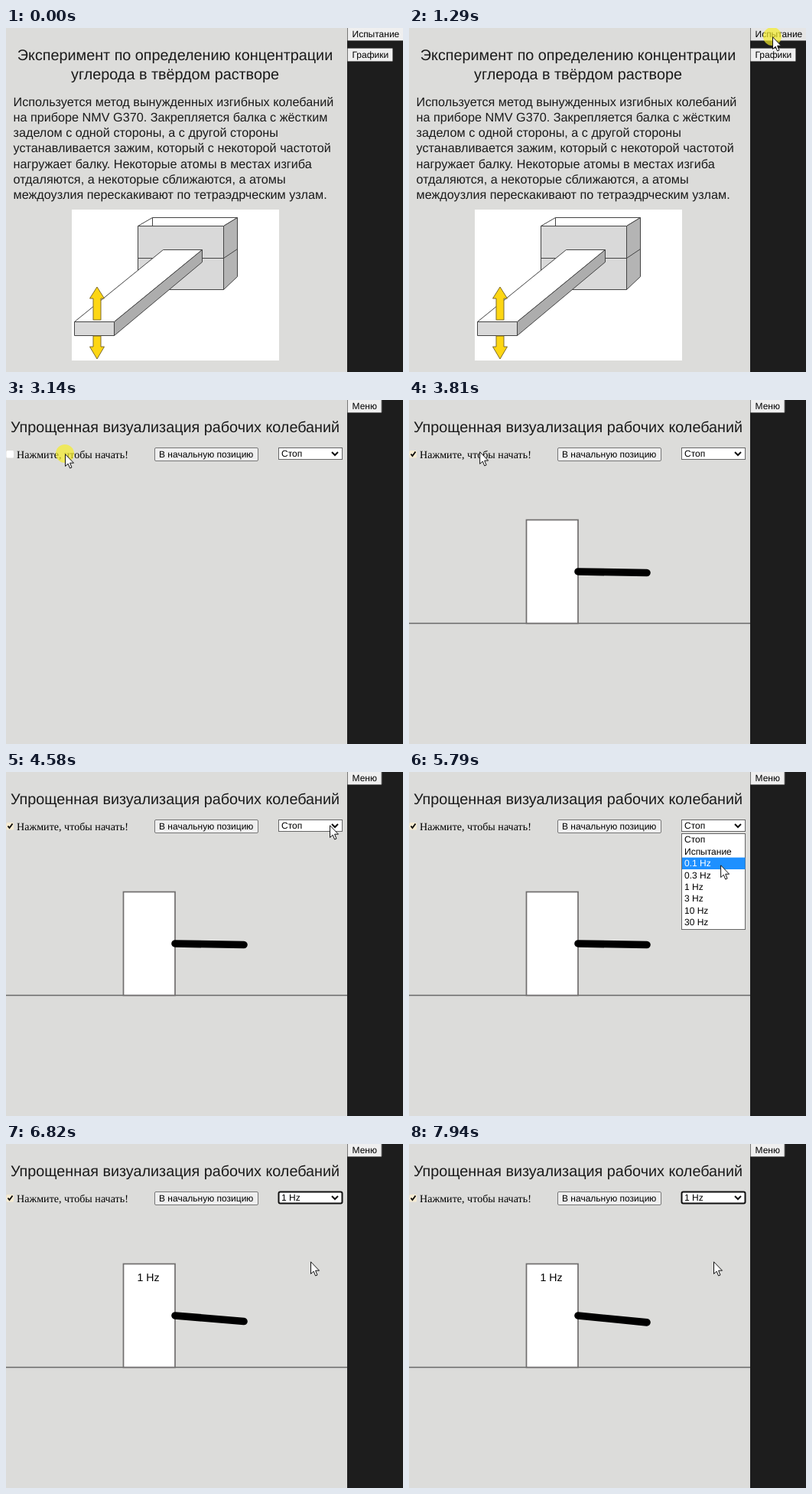
These frames come from a looping animation (519x449 px, 8 s). An HTML page:

```html
<!DOCTYPE html>
<html lang="ru">
<head>
<meta charset="utf-8">
<style>
  html, body { margin: 0; width: 519px; height: 449px; overflow: hidden; background: #dcdcda; }
  svg { display: block; font: 12px "Liberation Sans", Arial, sans-serif; text-rendering: geometricPrecision; }
  .title { font-size: 19.8px; text-anchor: middle; fill: #1a1a1a; }
  .body { font-size: 16.22px; fill: #1a1a1a; }
  .label { font: 14.1px "Liberation Serif", "Times New Roman", serif; }
  .btn { fill: #efefef; stroke: #767676; }
  .hover { fill: #e5e5e5; }
  .edge { stroke: #444; stroke-width: 1; stroke-linejoin: round; }
  .arrow { fill: #fdd613; stroke: #7d6a2c; }
</style>
</head>
<body>
<svg width="519" height="449" viewBox="0 0 519 449">
  <rect width="519" height="449" fill="#dcdcda"/>
  <rect x="446" width="73" height="449" fill="#1d1d1d"/>

  <g id="intro">
    <text class="title" x="221" y="41.5">Эксперимент по определению концентрации</text>
    <text class="title" x="221" y="67">углерода в твёрдом растворе</text>
    <g id="lines" class="body"></g>
    <rect x="86" y="237" width="271" height="197" fill="#fff"/>
    <g class="edge" transform="translate(.5 .5)">
      <path fill="#fff" d="M172 258L191 247H302L284 258Z"/>
      <path fill="none" d="M191 247V258"/>
      <path fill="#b4b4b4" d="M284 258L302 247V324L284 341Z"/>
      <path fill="#d9d9d9" d="M172 258H284V341H172Z"/>
      <path fill="none" d="M172 300H284L302 288"/>
      <path fill="#fff" d="M89 383L205 289H256L141 383Z"/>
      <path fill="#adadad" d="M141 383L256 289V305L141 401Z"/>
      <path fill="#d9d9d9" d="M89 383H141V401H89Z"/>
    </g>
    <path class="arrow" d="M119 338L128.500 353H124V381H114V353H109.500Z"/>
    <path class="arrow" d="M114 402H124V416H128.500L119 432L109.500 416H114Z"/>
    <rect id="testBtn" class="btn" x="446.500" y="-2" width="80" height="18.500" rx="1"/>
    <text x="452.500" y="12">Испытание</text>
    <rect class="btn" x="446.500" y="26.500" width="59" height="17" rx="1"/>
    <text x="452.500" y="39">Графики</text>
  </g>

  <g id="demo">
    <text class="title" x="221" y="41.5">Упрощенная визуализация рабочих колебаний</text>
    <rect id="menuBtn" class="btn" x="446.500" y="-2" width="44.500" height="18.500" rx="1"/>
    <text x="452.500" y="12">Меню</text>
    <rect id="box" x="0.500" y="66" width="9.500" height="9.500" rx="1.500" fill="#fff"/>
    <text class="label" x="14" y="76">Нажмите, чтобы начать!</text>
    <rect class="btn" x="194.500" y="62.500" width="135" height="17" rx="1.500"/>
    <text x="200" y="75">В начальную позицию</text>

    <g id="rig">
      <path d="M2.500 70.500L4.500 73L8.500 67.500" fill="none" stroke="#000" stroke-width="1.800"/>
      <path d="M0 291.500H446" stroke="#686868" stroke-width="1.700"/>
      <rect x="153.500" y="156.500" width="67.500" height="135" fill="#fff" stroke="#706e6e" stroke-width="1.700"/>
      <text id="freq" x="171.500" y="179" font-size="14.2">1 Hz</text>
      <path id="beam" stroke="#000" stroke-width="9.600" stroke-linecap="round"/>
    </g>

    <rect id="select" x="356.500" y="62.500" width="83" height="15" fill="#fff"/>
    <text id="value" x="360" y="74"></text>
    <path d="M426 68L430 72L434 68" fill="none" stroke="#111" stroke-width="2"/>
    <g id="list">
      <rect x="356.500" y="80.500" width="83" height="125" fill="#fff" stroke="#666"/>
      <rect id="mark" x="357" width="82.500" height="15.400" fill="#1e90ff"/>
    </g>
  </g>

  <circle id="halo" r="12" fill="#f5ec2a" opacity=".7"/>
  <path id="cursor" fill="#fff" stroke="#111" d="M.5 .8V16.500L4.200 13.200L6.600 19L9 18L6.600 12.200H11.500Z"/>
</svg>
<script>
const $ = id => document.getElementById(id);
const set = (id, attrs) => { for (const k in attrs) $(id).setAttribute(k, attrs[k]); };
const show = (id, on) => { $(id).style.display = on ? '' : 'none'; };

function addText(parent, x, y, text) {
  const node = document.createElementNS('http://www.w3.org/2000/svg', 'text');
  node.setAttribute('x', x);
  node.setAttribute('y', y);
  node.textContent = text;
  $(parent).append(node);
  return node;
}

[
  'Используется метод вынужденных изгибных колебаний',
  'на приборе NMV G370. Закрепляется балка с жёстким',
  'заделом с одной стороны, а с другой стороны',
  'устанавливается зажим, который с некоторой частотой',
  'нагружает балку. Некоторые атомы в местах изгиба',
  'отдаляются, а некоторые сближаются, а атомы',
  'междоузлия перескакивают по тетраэдрческим узлам.'
].forEach((text, i) => addText('lines', 9.5, 102 + i * 20.15, text));

const LOOP = 8000, ROW = 15.4, LIST_TOP = 80.8;
const options = ['Стоп', 'Испытание', '0.1 Hz', '0.3 Hz', '1 Hz', '3 Hz', '10 Hz', '30 Hz']
  .map((text, i) => addText('list', 360, LIST_TOP + i * ROW + 11.5, text));

const smooth = p => p * p * (3 - 2 * p);
const easeOut = p => 1 - (1 - p) ** 2;

// start, end, easing, then from / control / to of a quadratic curve
const moves = [
  [255, 1020, easeOut, [416, 417], [440, 170], [475, 11]],
  [1650, 2460, smooth, [475, 11], [270, 124], [77, 70]],
  [3700, 4580, smooth, [77, 70], [250, 33], [423, 69]],
  [5570, 6140, easeOut, [423, 69], [410, 110], [398, 153]]
];
// halo on, halo off
const clicks = [[1290, 1420], [3140, 3340], [5180, 5310], [6340, 6480]];
const within = (t, a, b) => t >= a && t < b;

function cursorAt(t) {
  const [start, end, ease, a, c, b] = moves.findLast(m => t >= m[0]) || moves[0];
  const u = ease(Math.min(1, Math.max(0, (t - start) / (end - start))));
  return [0, 1].map(i => (1 - u) ** 2 * a[i] + 2 * u * (1 - u) * c[i] + u * u * b[i]);
}

function draw(t) {
  const [x, y] = cursorAt(t);
  const onDemo = t >= 1360, started = t >= 3270, running = t >= 6410;
  show('intro', !onDemo);
  show('demo', onDemo);
  show('rig', started);
  show('freq', running);
  show('list', within(t, 5310, 6410));
  show('cursor', t >= 260);
  show('halo', clicks.some(([on, off]) => within(t, on, off)));
  set('cursor', { transform: `translate(${x} ${y})` });
  set('halo', { cx: x, cy: y });

  const overButton = t >= 260 && x > 446 && y < 17;
  $('testBtn').classList.toggle('hover', overButton);
  $('menuBtn').classList.toggle('hover', overButton && x < 491);
  set('box', { fill: started ? '#f7ecd2' : '#fff' });
  set('select', running
    ? { stroke: '#101010', 'stroke-width': 2, rx: 2 }
    : { stroke: '#666', 'stroke-width': 1, rx: 0 });
  $('value').textContent = running ? '1 Hz' : 'Стоп';

  const row = Math.max(0, Math.floor((y - LIST_TOP) / ROW));
  set('mark', { y: LIST_TOP + row * ROW });
  options.forEach((node, i) => node.setAttribute('fill', i === row ? '#fff' : '#000'));

  const tip = running ? 224 + 9 * Math.sin((t - 6664) / 1000 * 2 * Math.PI) : 225.5;
  set('beam', { d: `M221 224L311 ${tip}` });
}

function frame() {
  draw(performance.now() % LOOP);
  requestAnimationFrame(frame);
}
frame();
</script>
</body>
</html>
```
